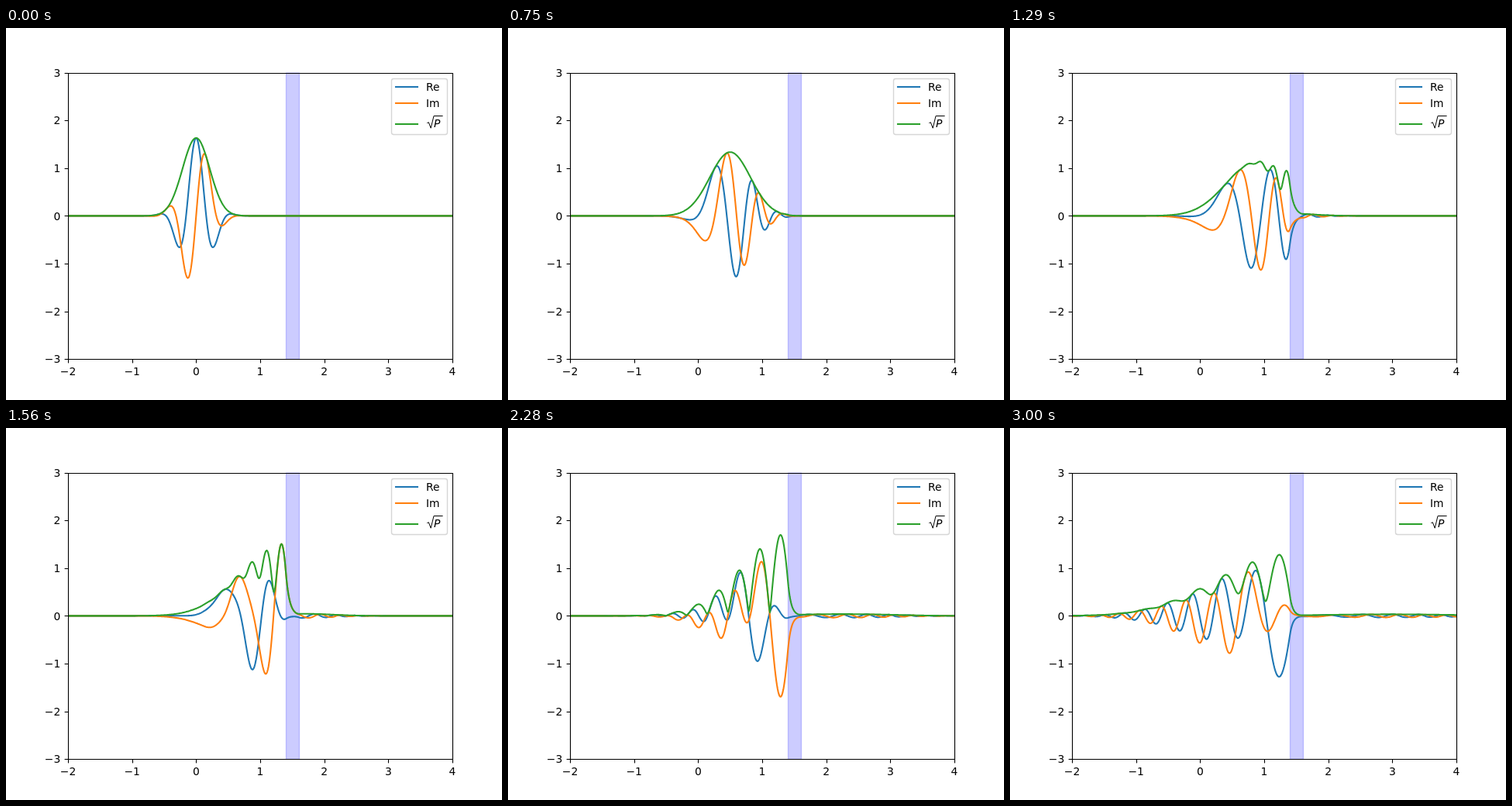
An HTML page for the animation above (3030 ms loop, 640x480 px).

```html
<!DOCTYPE html>
<html lang="en">
<head>
<meta charset="utf-8">
<title>Wave packet at a barrier</title>
<style>
  html, body { margin: 0; width: 100%; height: 100%; overflow: hidden; background: #fff; }
  svg { display: block; width: 640px; height: 480px; }
  text { font: 13.89px "DejaVu Sans", sans-serif; fill: #000; }
  .wave { fill: none; stroke-width: 2.083; stroke-linejoin: round; stroke-linecap: square; }
  .re { stroke: #1f77b4; }
  .im { stroke: #ff7f0e; }
  .abs { stroke: #2ca02c; }
  .axis { fill: none; stroke: #000; stroke-width: 1.11; }
  .mid { text-anchor: middle; }
  .end { text-anchor: end; }
</style>
</head>
<body>
<svg viewBox="0 0 640 480">
  <clipPath id="plot"><rect x="80" y="57.6" width="496" height="369.6"/></clipPath>
  <g clip-path="url(#plot)">
    <rect x="361.5" y="57.5" width="17" height="370" fill="#00f" fill-opacity=".2"
          stroke="#00f" stroke-opacity=".2" stroke-width="1.39"/>
    <path id="re" class="wave re"/>
    <path id="im" class="wave im"/>
    <path id="abs" class="wave abs"/>
  </g>
  <g id="axes"><path class="axis" d="M80.5 58.5H576.5V427.5H80.5Z"/></g>
  <g id="legend">
    <rect x="497.5" y="65.5" width="72" height="72" rx="2.8" fill="#fff" fill-opacity=".8"
          stroke="#ccc" stroke-opacity=".8" stroke-width="1.39"/>
    <path class="wave re" d="M503 76H531"/>
    <path class="wave im" d="M503 97H531"/>
    <path class="wave abs" d="M503 124H531"/>
    <text x="542" y="81">Re</text>
    <text x="542" y="102">Im</text>
    <path d="M543.4 122.6L545.3 121.7L548.2 129.2L552 113.5H563.6" fill="none" stroke="#000"/>
    <text x="552" y="128" font-style="oblique" style="font-style:oblique">P</text>
  </g>
</svg>
<script>
const start = performance.now();
const FRAMES = 101, FRAME_MS = 30;
const $ = id => document.getElementById(id);
const px = x => 80 + (x + 2) * 496 / 6;
const py = y => 242.4 - y * 61.6;

// Axis ticks and labels
const label = n => (n < 0 ? "\u2212" : "") + Math.abs(n);
let marks = "";
for (let n = -2; n <= 4; n++) {
  const x = Math.round(px(n)) + 0.5;
  marks += `<path class="axis" d="M${x} 427.5v4.9"/><text class="mid" x="${px(n)}" y="448">${label(n)}</text>`;
}
for (let n = -3; n <= 3; n++) {
  const y = Math.round(py(n)) + 0.5;
  marks += `<path class="axis" d="M80.5 ${y}h-4.9"/><text class="end" x="70.3" y="${Math.round(py(n) + 5.2)}">${label(n)}</text>`;
}
$("axes").insertAdjacentHTML("beforeend", marks);

// Schrodinger equation (hbar = m = 1) on a grid, solved by Crank-Nicolson
const LEFT = -4, DX = 0.005, N = 2001;
const STEPS = 4, DT = 0.002 / STEPS;
const K0 = 10, SIGMA = 0.15, HEIGHT = 250;
const index = x => Math.round((x - LEFT) / DX);
const wallA = index(1.4), wallB = index(1.6);
const potential = j =>
  j < wallA || j > wallB ? 0 : j === wallA || j === wallB ? HEIGHT / 2 : HEIGHT;

const array = () => new Float64Array(N);
const re = array(), im = array(), dr = array(), di = array(), mr = array(), mi = array();
const s = DT / (4 * DX * DX);
const peak = (2 * Math.PI * SIGMA ** 2) ** -0.25;

for (let j = 0; j < N; j++) {
  const x = LEFT + j * DX;
  const env = peak * Math.exp(-x * x / (4 * SIGMA ** 2));
  re[j] = env * Math.cos(K0 * x);
  im[j] = env * Math.sin(K0 * x);
  // Inverse pivots of the tridiagonal matrix
  const a = 1 + (j ? s * s * mr[j - 1] : 0);
  const b = DT / 2 * (1 / (DX * DX) + potential(j)) + (j ? s * s * mi[j - 1] : 0);
  const q = a * a + b * b;
  mr[j] = a / q;
  mi[j] = -b / q;
}

function step() {
  let r = 0, i = 0;
  for (let j = 0; j < N; j++) {
    const u = re[j] - s * i, v = im[j] + s * r;
    r = dr[j] = mr[j] * u - mi[j] * v;
    i = di[j] = mr[j] * v + mi[j] * u;
  }
  r = i = 0;
  for (let j = N - 1; j >= 0; j--) {
    const u = s * i, v = -s * r;
    r = dr[j] - (mr[j] * u - mi[j] * v);
    i = di[j] - (mr[j] * v + mi[j] * u);
    re[j] = 2 * r - re[j];
    im[j] = 2 * i - im[j];
  }
}

const first = index(-2), last = index(4);
const waves = [];
for (let f = 0; f < FRAMES; f++) {
  waves.push({ re: re.slice(first, last + 1), im: im.slice(first, last + 1) });
  for (let n = 0; n < STEPS; n++) step();
}

function trace(id, value) {
  let d = "";
  for (let j = 0; j <= last - first; j += 2)
    d += (j ? "L" : "M") + px(-2 + j * DX).toFixed(2) + " " + py(value(j)).toFixed(2);
  $(id).setAttribute("d", d);
}

let shown = -1;
function draw() {
  const f = Math.floor((performance.now() - start) / FRAME_MS) % FRAMES;
  if (f !== shown) {
    const w = waves[f];
    trace("re", j => w.re[j]);
    trace("im", j => w.im[j]);
    trace("abs", j => Math.hypot(w.re[j], w.im[j]));
    shown = f;
  }
  requestAnimationFrame(draw);
}
draw();
</script>
</body>
</html>
```
